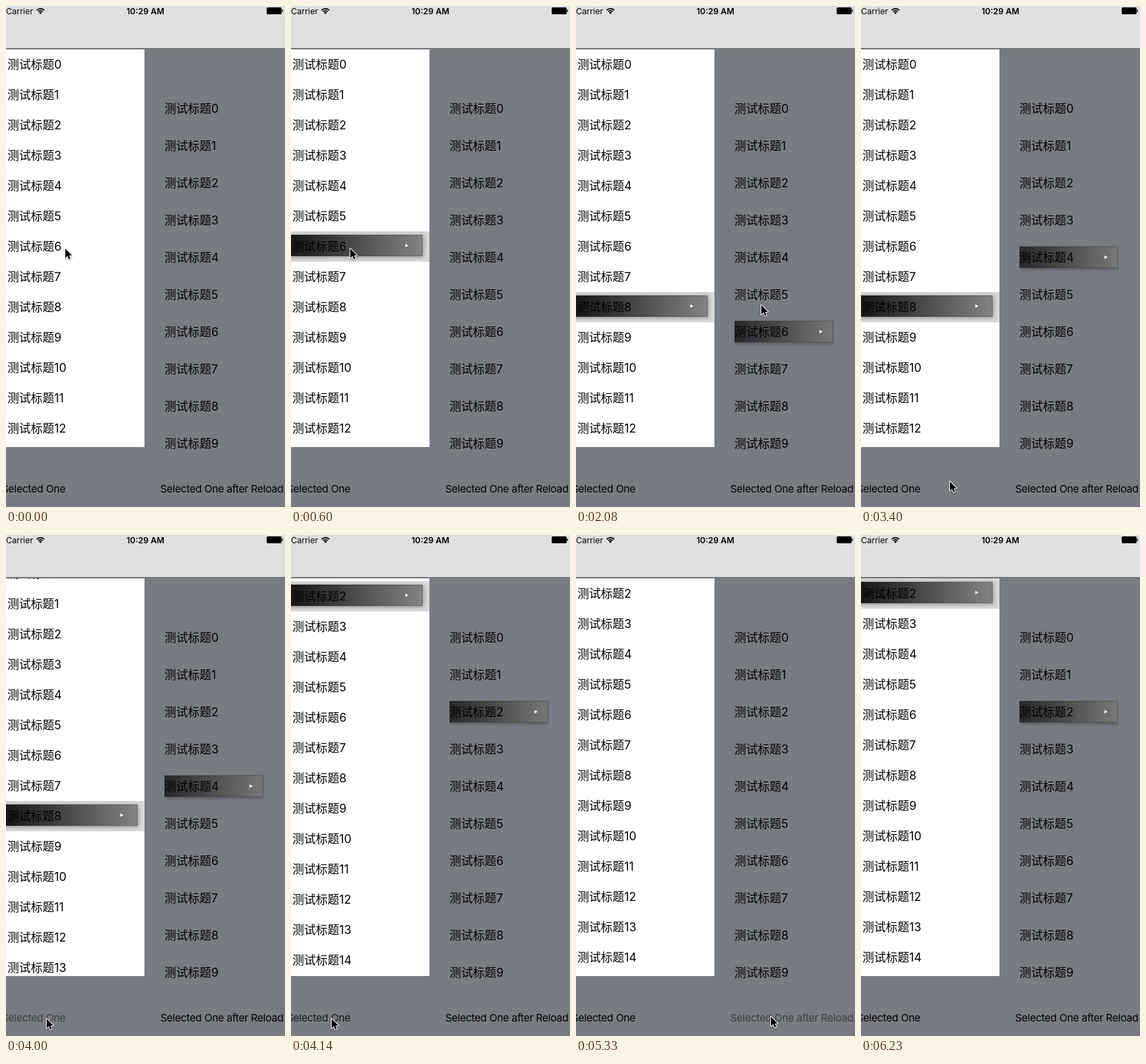
Write an HTML page with a canvas that moves like this. It is 405 px wide and 727 px high and loops after 6500 ms.

```html
<!DOCTYPE html>
<html lang="zh-CN">
<head>
<meta charset="utf-8">
<title>List selection</title>
<style>
  html, body { margin: 0; width: 100%; height: 100%; overflow: hidden; background: #797b83; }
  canvas { display: block; width: 405px; height: 727px; }
</style>
</head>
<body>
<canvas id="stage" width="405" height="727"></canvas>
<script>
const W = 405, H = 727, LOOP = 6500;
const TICK = 148.2;   // the screen refreshes once per tick; all times below are in ticks
const ctx = document.getElementById('stage').getContext('2d');
const FONT = 'Inter, "Noto Sans CJK SC", "Noto Sans CJK", sans-serif';
const LIST = { top: 63, bottom: 640, right: 201, row: 44 };
const GRID = { x: 230, right: 374, first: 149, row: 54 };

// Places where the pointer rests, from arrival to departure.
const STOPS = [
  { from: 0, to: 5, x: 85, y: 351 },
  { from: 8, to: 8, x: 76, y: 426 },
  { from: 12, to: 13.5, x: 268, y: 474 },
  { from: 17, to: 19, x: 269, y: 364 },
  { from: 25, to: 30, x: 58, y: 701 },
  { from: 33.4, to: 40, x: 282, y: 698 },
  { from: 41, to: 42, x: 290, y: 703 }
];

// Selected rows; the reload clears both for one tick.
const PICKS = [
  { at: 0, left: -1, right: -1 },
  { at: 4, left: 6 },
  { at: 8, left: 8 },
  { at: 13, right: 6 },
  { at: 17, right: 4 },
  { at: 28, left: 2, right: 2 },
  { at: 36, left: -1, right: -1 },
  { at: 37, left: 2, right: 2 }
];

const clamp = v => Math.max(0, Math.min(1, v));
const smooth = v => v * v * (3 - 2 * v);
const easeOut = v => 1 - (1 - v) ** 3;
const mix = (a, b, p) => a + (b - a) * p;

const picksAt = k => Object.assign({}, ...PICKS.filter(p => p.at <= k));
const scrollAt = k => Math.round(2 * LIST.row * smooth(clamp((k - 26.2) / 2.07)));

// A title dims on press and fades back after release.
const titleAlpha = (k, press) => k < press ? 1 : mix(0.2, 1, clamp((k - press - 1) / 2.7));

// Sideways at a steady pace, vertically slowing down.
function pointerAt(k) {
  const i = STOPS.findLastIndex(s => s.from <= k);
  const a = STOPS[i], b = STOPS[i + 1] || a;
  const p = k > a.to ? (k - a.to) / (b.from - a.to) : 0;
  return [mix(a.x, b.x, p), mix(a.y, b.y, easeOut(p))];
}

function rect(color, x, y, w, h) {
  ctx.fillStyle = color;
  ctx.fillRect(x, y, w, h);
}

function text(str, x, y, size, { weight = 400, spacing = 0, alpha = 1 } = {}) {
  ctx.font = `${weight} ${size}px ${FONT}`;
  ctx.letterSpacing = spacing + 'px';
  ctx.fillStyle = `rgba(0,0,0,${alpha})`;
  ctx.fillText(str, x, y);
}

function clipTo(x, y, w, h, draw) {
  ctx.save();
  ctx.beginPath();
  ctx.rect(x, y, w, h);
  ctx.clip();
  draw();
  ctx.restore();
}

function bar(x, y, right, arrowX, dark, light) {
  const h = 31;
  const g = ctx.createLinearGradient(x, 0, right, 0);
  g.addColorStop(0, dark);
  g.addColorStop(1, light);
  ctx.save();
  ctx.shadowColor = 'rgba(0,0,0,.4)';
  ctx.shadowBlur = 6;
  ctx.shadowOffsetX = 1;
  ctx.shadowOffsetY = 1;
  rect(g, x, y, right - x, h);
  ctx.restore();
  ctx.strokeStyle = 'rgba(40,40,42,.25)';
  ctx.lineWidth = 1;
  ctx.strokeRect(x - 0.5, y + 0.5, right - x, h - 1);
  ctx.fillStyle = '#fff';
  ctx.beginPath();
  ctx.moveTo(arrowX, y + 13);
  ctx.lineTo(arrowX + 4.5, y + 15.5);
  ctx.lineTo(arrowX, y + 18);
  ctx.fill();
}

function list(selected, scroll) {
  const { top, bottom, right, row } = LIST;
  clipTo(0, top, right, bottom - top, () => {
    rect('#fff', 0, top, right, bottom - top);
    for (let i = 0; i < 16; i++) {
      const y = top + i * row - scroll;
      if (i === selected) {
        clipTo(0, y, right, row, () => {
          rect('#d9d9d9', 0, y, right, row);
          bar(-8, y + 5, 191, 166, '#121213', '#828483');
        });
      }
      text('测试标题' + i, 2, y + 28, 17);
    }
  });
}

function grid(selected) {
  const { x, right, first, row } = GRID;
  for (let i = 0; i < 10; i++) {
    const y = first + i * row;
    if (i === selected) {
      clipTo(x, y - 17, right - x, 38, () => bar(x, y - 16, 373, 353.5, '#262728', '#767878'));
    }
    text('测试标题' + i, x, y + 6, 17);
  }
}

function header() {
  rect('#dedfe1', 0, 0, W, 61);
  rect('#6c6e75', 0, 61, W, 1);
  text('Carrier', 0, 12, 12);
  text('10:29 AM', 175, 12, 12, { weight: 600 });

  const fan = r => {
    ctx.beginPath();
    ctx.arc(50, 11.5, r, -Math.PI * 0.76, -Math.PI * 0.24);
  };
  ctx.strokeStyle = ctx.fillStyle = '#000';
  ctx.lineWidth = 1.7;
  for (const r of [4.7, 7.7]) {
    fan(r);
    ctx.stroke();
  }
  fan(2.8);
  ctx.lineTo(50, 12);
  ctx.fill();

  ctx.beginPath();
  ctx.roundRect(378.5, 2, 21.5, 10, 1.5);
  ctx.roundRect(400.5, 5, 1.3, 4, 0.6);
  ctx.fill();
}

function buttons(k) {
  text('Selected One', -6, 706, 15, { spacing: -0.25, alpha: titleAlpha(k, 25) });
  text('Selected One after Reload', 224, 706, 15, { spacing: -0.25, alpha: titleAlpha(k, 34) });
}

function pointer(k) {
  const [x, y] = pointerAt(k);
  ctx.save();
  ctx.translate(Math.round(x) + 1, Math.round(y) + 1);
  ctx.scale(0.86, 0.86);
  ctx.lineJoin = 'round';
  ctx.lineWidth = 2.4;
  ctx.strokeStyle = '#fff';
  ctx.fillStyle = '#000';
  ctx.shadowColor = 'rgba(0,0,0,.4)';
  ctx.shadowBlur = 2;
  ctx.shadowOffsetY = 1;
  const arrow = new Path2D('M0 0V16L3.7 12.6 6.2 18 8.7 17 6.4 11.6 11.3 11.4Z');
  ctx.stroke(arrow);
  ctx.shadowColor = 'transparent';
  ctx.fill(arrow);
  ctx.restore();
}

function draw(k) {
  const { left, right } = picksAt(k);
  rect('#797b83', 0, 0, W, H);
  header();
  list(left, scrollAt(k));
  grid(right);
  buttons(k);
  if (k < 42) pointer(k);
}

const start = performance.now();
function frame() {
  const t = (performance.now() - start) % LOOP;
  draw(Math.floor((t + 12) / TICK));
  requestAnimationFrame(frame);
}
frame();
</script>
</body>
</html>
```
